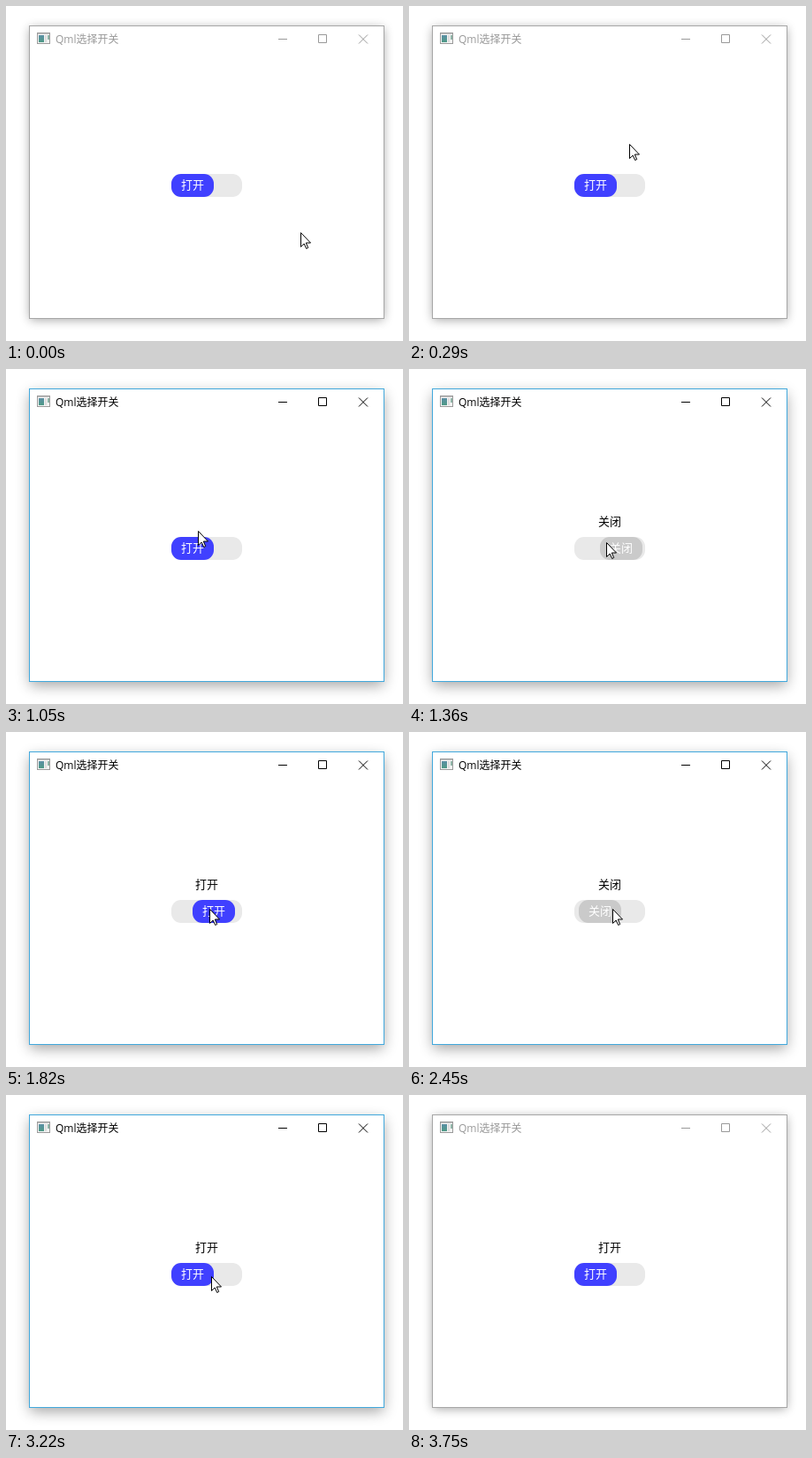
An HTML page that plays this animation: 449 px wide and 379 px high, repeating every 3830 ms.

```html
<!DOCTYPE html>
<html lang="zh-CN">
<head>
<meta charset="utf-8">
<style>
  html, body { margin: 0; width: 100%; height: 100%; overflow: hidden; background: #fff; }
  svg { display: block; width: 449px; height: 379px; }
  text { font: 13px "Noto Sans CJK SC", "Noto Sans CJK", sans-serif; text-anchor: middle; }
  #title { font: 12px "Open Sans", "Noto Sans CJK SC", "Noto Sans CJK", sans-serif; text-anchor: start; }
</style>
</head>
<body>
<svg viewBox="0 0 449 379">
  <defs>
    <filter id="blur" x="-20%" y="-20%" width="140%" height="140%">
      <feGaussianBlur id="softness" stdDeviation="6"/>
    </filter>
    <linearGradient id="pane" x2="0" y2="1">
      <stop stop-color="#5c8fa5"/>
      <stop offset="1" stop-color="#4f9a86"/>
    </linearGradient>
  </defs>

  <rect id="shadow" x="27" width="400" height="330" fill="#000" opacity=".36" filter="url(#blur)"/>
  <rect id="frame" x="26.5" y="22.5" width="401" height="331" fill="#fff"/>

  <g id="icon">
    <rect x="35.5" y="30.5" width="14" height="12" fill="#f4f4f4" stroke="#9a9a9a"/>
    <path d="M36 31.5H49" stroke="#c4c4c4"/>
    <rect x="37" y="33" width="6" height="8" fill="url(#pane)"/>
    <rect x="44" y="33" width="2" height="8" fill="#dcdcdc"/>
    <rect x="47" y="33" width="2" height="5" fill="#8fb5a8"/>
  </g>
  <text id="title" x="56" y="42">Qml选择开关</text>
  <g id="buttons" fill="none">
    <path d="M308 37.5H318M353.5 32.5H362.5V41.5H353.5Z"/>
    <path d="M399 32.5L409 42.5M409 32.5L399 42.5"/>
  </g>

  <text id="label" x="227" y="177"></text>
  <rect x="187" y="190" width="80" height="26" rx="11" fill="#e9e9e9"/>
  <g id="knob">
    <rect id="knobBody" y="190" width="48" height="26" rx="11"/>
    <text id="knobText" x="24" y="207" fill="#fff"></text>
  </g>
  <path id="cursor" d="M.5 .5V16.5L4.2 13 6.7 18.5 8.7 17.5 6.3 12H11.5Z" fill="#fff" stroke="#000"/>
</svg>

<script>
const LOOP = 3830;
const TRACK_LEFT = 187, TRAVEL = 32;
const ACTIVE_FROM = 440, ACTIVE_TO = 3750, CURSOR_GONE = 3600;

// Bursts of screen updates: first time, last time, count
const bursts = [
  [0, 0, 1], [70, 590, 8], [820, 1280, 7], [1360, 1520, 3], [1670, 1670, 1],
  [1820, 2050, 4], [2450, 2600, 3], [2980, 3370, 6], [3520, 3600, 2], [3750, 3750, 1]
];
const ticks = bursts.flatMap(([first, last, count]) =>
  Array.from({ length: count }, (_, i) =>
    Math.round(first + (last - first) * i / Math.max(1, count - 1))));

// Pointer moves: start, end, destination
const moves = [
  [0, 440, 164, 55], [520, 590, 164, 53], [750, 1120, 223, 196], [1440, 1520, 229, 200],
  [1590, 1670, 230, 200], [3140, 3210, 232, 205], [3210, 3370, 381, 363], [3370, 3520, 384, 368]
];

// Clicks: time, slide duration, resulting state
const clicks = [[1180, 200, false], [1772, 200, true], [2424, 170, false], [2930, 200, true]];

const el = id => document.getElementById(id);
const set = (id, attrs) => {
  for (const name in attrs) el(id).setAttribute(name, attrs[name]);
};
const progress = (t, start, end) => Math.min(1, Math.max(0, (t - start) / (end - start)));
const smooth = p => p * p * (3 - 2 * p);

function pointerAt(t) {
  let x = 333, y = 256;
  for (const [start, end, toX, toY] of moves) {
    const p = smooth(progress(t, start, end));
    x += (toX - x) * p;
    y += (toY - y) * p;
  }
  return [Math.round(x), Math.round(y)];
}

function switchAt(t) {
  const click = clicks.findLast(([time]) => time <= t);
  if (!click) return { on: true, x: TRACK_LEFT, clicked: false };
  const [time, duration, on] = click;
  const p = progress(t, time, time + duration);
  return { on, x: Math.round(TRACK_LEFT + TRAVEL * (on ? 1 - p : p)), clicked: true };
}

function render(time) {
  const t = ticks.findLast(tick => tick <= time);

  const active = t >= ACTIVE_FROM && t < ACTIVE_TO;
  const ink = active ? "#000" : "#999";
  set("frame", { stroke: active ? "#41a8dc" : "#a6a6a6" });
  set("shadow", { y: active ? 28 : 25 });
  set("softness", { stdDeviation: active ? 8 : 6 });
  set("title", { fill: ink });
  set("buttons", { stroke: ink });

  const { on, x, clicked } = switchAt(t);
  const caption = on ? "打开" : "关闭";
  set("knob", { transform: `translate(${x})` });
  set("knobBody", { fill: on ? "#4040ff" : "#cacaca" });
  el("knobText").textContent = caption;
  el("label").textContent = clicked ? caption : "";

  set("cursor", {
    transform: `translate(${pointerAt(t)})`,
    visibility: t < CURSOR_GONE ? "visible" : "hidden"
  });
}

const began = performance.now();
function loop() {
  render((performance.now() - began) % LOOP);
  requestAnimationFrame(loop);
}
loop();
</script>
</body>
</html>
```
